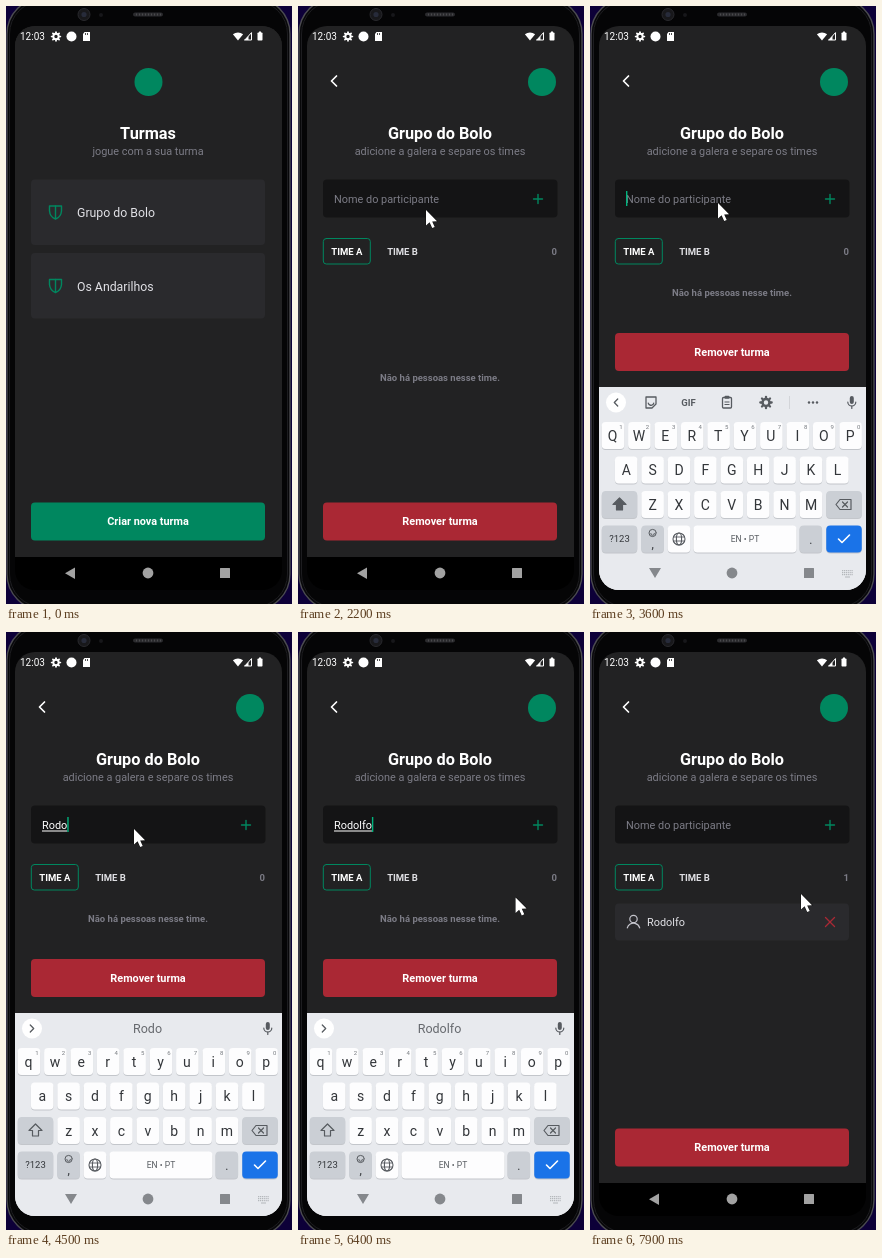
An HTML page with a canvas for the animation above (8000 ms loop, 286 px wide and 598 px high).

```html
<!DOCTYPE html>
<html lang="pt">
<head>
<meta charset="utf-8">
<title>Turmas</title>
<style>
html, body { margin: 0; width: 100%; height: 100%; overflow: hidden; background: #0d0038; }
canvas { display: block; width: 286px; height: 598px; }
</style>
</head>
<body>
<canvas id="stage"></canvas>
<script>
const W = 286, H = 598, LOOP = 8000, STEP = 100;
const GROUP = 'Grupo do Bolo', GROUP2 = 'Os Andarilhos', PLAYER = 'Rodolfo';
const C = {
  bg: '#222223', card: '#2a2a2d', field: '#141415', grey: '#7c7c86', text: '#e1e1e6',
  green: '#00875f', red: '#aa2834', kb: '#e8eaee', key: '#fdfdfe', mod: '#cbcfd5', ink: '#33363a', icon: '#575b60'
};
const canvas = document.getElementById('stage');
const g = canvas.getContext('2d');
const dpr = window.devicePixelRatio || 1;
canvas.width = W * dpr;
canvas.height = H * dpr;

const clamp = v => Math.max(0, Math.min(1, v));
const ease = v => v * v * (3 - 2 * v);

function rect(x, y, w, h, r, fill, stroke, lw = 1) {
  g.beginPath();
  g.roundRect(x, y, w, h, r);
  if (fill) { g.fillStyle = fill; g.fill(); }
  if (stroke) { g.strokeStyle = stroke; g.lineWidth = lw; g.stroke(); }
}
function disc(x, y, r, fill, stroke, lw = 1) {
  g.beginPath();
  g.arc(x, y, r, 0, Math.PI * 2);
  if (fill) { g.fillStyle = fill; g.fill(); }
  if (stroke) { g.strokeStyle = stroke; g.lineWidth = lw; g.stroke(); }
}
function line(pts, color, lw = 1.2, closed = false) {
  shape(pts);
  if (closed) g.closePath();
  g.strokeStyle = color;
  g.lineWidth = lw;
  g.lineCap = g.lineJoin = 'round';
  g.stroke();
}
function shape(pts, fill) {
  g.beginPath();
  for (let i = 0; i < pts.length; i += 2) g.lineTo(pts[i], pts[i + 1]);
  if (fill) { g.fillStyle = fill; g.fill(); }
}
// y is the middle of the capital letters
function label(s, x, y, size, color, weight = 400, align = 'left') {
  g.font = `${weight} ${size}px Roboto, sans-serif`;
  g.textAlign = align;
  g.fillStyle = color;
  g.fillText(s, x, y + size * 0.355);
  return g.measureText(s).width;
}
function withAlpha(a, draw) {
  g.save();
  g.globalAlpha *= a;
  draw();
  g.restore();
}
function scaled(k, draw) {
  g.save();
  g.translate(142.5, 285.5);
  g.scale(k, k);
  g.translate(-142.5, -285.5);
  draw();
  g.restore();
}

function gear(x, y, r, color) {
  for (let i = 0; i < 8; i++) {
    const a = i * Math.PI / 4, c = Math.cos(a), s = Math.sin(a);
    line([x + c * r * 0.7, y + s * r * 0.7, x + c * r * 0.95, y + s * r * 0.95], color, r * 0.38);
  }
  disc(x, y, r * 0.58, null, color, r * 0.42);
}
function shield(x, y) {
  g.beginPath();
  g.moveTo(x - 6, y - 6);
  g.lineTo(x + 6, y - 6);
  g.lineTo(x + 6, y - 1);
  g.quadraticCurveTo(x + 5.5, y + 5, x, y + 7);
  g.quadraticCurveTo(x - 5.5, y + 5, x - 6, y - 1);
  g.closePath();
  g.strokeStyle = C.green;
  g.lineWidth = 1.4;
  g.lineJoin = 'round';
  g.stroke();
  line([x, y - 6, x, y + 6.5], C.green, 1.4);
}

function phone() {
  g.fillStyle = '#0d0038';
  g.fillRect(0, 0, W, H);
  rect(1, -8, 283, 612, 36, '#08080a', '#4b4b50', 1.4);
  rect(3.5, -5, 278, 606, 33, '#050506', '#1d1d20', 1);
  disc(78, 8.5, 6, '#18181b', '#29292d');
  disc(78, 8.5, 2.6, '#272b3a');
  disc(95, 9, 2, '#17171a');
  rect(127, 6.5, 30, 4, 2, '#2b2b2e');
  for (let x = 130; x < 156; x += 3) rect(x, 7.5, 1, 2, 0, '#4a4a4d');
}
function statusBar() {
  label('12:03', 14, 30.5, 10, '#fff');
  gear(50, 30.5, 4.6, '#fff');
  disc(65.5, 30.5, 5, '#fff');
  shape([78.5, 26, 84, 26, 84, 35, 77, 35, 77, 28], '#fff');
  for (const x of [79, 81]) rect(x, 27, 0.8, 2, 0, C.bg);
  g.beginPath();
  g.moveTo(232, 34.5);
  g.arc(232, 34.5, 8, -Math.PI * 0.72, -Math.PI * 0.28);
  g.fillStyle = '#fff';
  g.fill();
  line([238.5, 34, 245.5, 34, 245.5, 27], '#fff', 1, true);
  shape([238.5, 34, 242.5, 34, 242.5, 30], '#fff');
  rect(251.5, 26.5, 5, 8, 0.8, '#fff');
  rect(253, 25.5, 2, 1.5, 0, '#fff');
}
function navBar(light, kbIcon) {
  const c = light ? '#85888c' : '#a2a2a2';
  g.fillStyle = light ? C.kb : '#000';
  g.fillRect(9, 551, 267, 34);
  shape(light ? [59, 562, 71, 562, 65, 572] : [69, 561.5, 69, 573, 59, 567.2], c);
  disc(142, 567, 5.4, c);
  rect(214, 562, 10, 10, 0.5, c);
  if (!kbIcon) return;
  const k = light ? '#b4b7bb' : '#777';
  for (let r = 0; r < 3; r++)
    for (let i = 0; i < 6; i++) rect(252 + i * 1.9, 564 + r * 2, 1.2, 1.2, 0, k);
  rect(255, 570.5, 5, 1, 0, k);
}

function button(s, y, color) {
  rect(25, y, 234, 38, 4, color);
  label(s, 142, y + 19, 10.9, '#fff', 700, 'center');
}
function heading(title, sub) {
  label(title, 142, 127.5, 16.3, '#fff', 700, 'center');
  label(sub, 142, 145.5, 10.9, C.grey, 400, 'center');
}
function background() {
  g.fillStyle = C.bg;
  g.fillRect(9, 20, 267, 531);
}
function groupCard(name, y) {
  rect(25, y, 234, 65.5, 4, C.card);
  shield(49.5, y + 32.5);
  label(name, 71, y + 33.5, 12.3, C.text);
}
function groupsScreen(press) {
  background();
  disc(142.5, 76, 14, C.green);
  heading('Turmas', 'jogue com a sua turma');
  withAlpha(press, () => groupCard(GROUP, 173.5));
  groupCard(GROUP2, 247);
  button('Criar nova turma', 496.5, C.green);
}

function playersScreen(s) {
  background();
  line([38.5, 70, 33.5, 75, 38.5, 80], '#fff', 1.7);
  disc(244, 76, 14, C.green);
  heading(GROUP, 'adicione a galera e separe os times');
  rect(25, 173.5, 234.5, 38, 4, C.field);
  let end = 36;
  if (s.typed) {
    const w = label(s.typed, 36, 193, 10.9, '#fff');
    rect(36, 198.6, w, 0.8, 0, '#fff');
    end += w;
  } else label('Nome do participante', 36, 193, 10.9, C.grey);
  if (s.caret) rect(end, 185, 1.4, 15, 0, '#00b37e');
  withAlpha(s.press ? 0.3 : 1, () => {
    line([235.5, 193, 244.5, 193], C.green, 1.4);
    line([240, 188.5, 240, 197.5], C.green, 1.4);
  });
  rect(25.3, 232.5, 47, 25.5, 3, null, C.green, 1);
  label('TIME A', 48.8, 245.5, 9.5, '#fff', 700, 'center');
  label('TIME B', 104.5, 245.5, 9.5, '#dedee2', 700, 'center');
  label(s.added ? '1' : '0', 259, 245.5, 9.5, C.grey, 700, 'right');
  if (s.added) {
    rect(25, 271.5, 234, 37, 4, C.card);
    disc(43.5, 287, 3.7, null, '#c4c4cc', 1.2);
    g.beginPath();
    g.arc(43.5, 297.5, 6.4, Math.PI * 1.08, Math.PI * 1.92);
    g.stroke();
    label(PLAYER, 57, 290.5, 10.9, C.text);
    line([235.5, 285.5, 244.5, 294.5], C.red, 1.3);
    line([244.5, 285.5, 235.5, 294.5], C.red, 1.3);
  } else if (s.spin) {
    rect(141.5, 293.5, 2, 1, 0, C.green);
  } else if (s.empty) {
    label('Não há pessoas nesse time.', 142, s.short ? 286.5 : 371.5, 9.5, C.grey, 700, 'center');
  }
  button('Remover turma', s.short ? 327 : 496.5, C.red);
}

function keyCap(x, y, w, fill = C.key) {
  rect(x - w / 2, y - 13 + 1, w, 27, 4, '#c3c6cb');
  rect(x - w / 2, y - 13, w, 27, 4, fill);
}
function keyRow(chars, x0, y, upper, digits) {
  [...chars].forEach((ch, i) => {
    const x = x0 + i * 26.4;
    keyCap(x, y, 22.6);
    label(upper ? ch.toUpperCase() : ch, x - (digits ? 0.5 : 0), y + 1, 14, C.ink, 400, 'center');
    if (digits) label(String((i + 1) % 10), x + 8, y - 8.5, 6, '#75797e', 400, 'center');
  });
}
function toolbar(word, open) {
  disc(26, 396.5, 10, '#fff');
  const d = open ? -1.7 : 1.7;
  line([26 - d, 393, 26 + d, 396.5, 26 - d, 400], C.icon, 1.3);
  rect(259.8, 390, 4, 8, 2, C.icon);
  g.beginPath();
  g.arc(261.8, 396, 4, 0, Math.PI);
  g.strokeStyle = C.icon;
  g.lineWidth = 1.2;
  g.stroke();
  line([261.8, 400, 261.8, 402.5], C.icon);
  if (word) label(word, 141.5, 397, 12.5, '#66696e', 400, 'center');
  if (!open) return;
  line([56, 391, 66, 391, 66, 398, 62, 402, 56, 402], C.icon, 1.3, true);
  g.beginPath();
  g.arc(61, 396.5, 2.8, 0.2, Math.PI - 0.2);
  g.stroke();
  label('GIF', 98.5, 396.5, 9.5, C.icon, 700, 'center');
  rect(132.5, 391.5, 9, 10.5, 1, null, C.icon, 1.3);
  rect(134.5, 389.8, 5, 3, 1, C.icon);
  for (const y of [395.5, 398]) rect(134.5, y, 5, 1, 0, C.icon);
  gear(176, 396.5, 6, C.icon);
  rect(199, 390, 0.8, 13, 0, '#cdd0d4');
  for (const x of [219, 223, 227]) disc(x, 396.5, 1.2, C.icon);
}
function keyboard(s) {
  g.fillStyle = C.kb;
  g.fillRect(9, 381, 267, 205);
  toolbar(s.typed, s.upper);
  keyRow('qwertyuiop', 23, 429, s.upper, true);
  keyRow('asdfghjkl', 36.2, 463.5, s.upper);
  keyRow('zxcvbnm', 62.6, 498, s.upper);
  keyCap(29.5, 498, 35.5, C.mod);
  const arrow = [29.5, 492, 36, 498.5, 32.5, 498.5, 32.5, 504, 26.5, 504, 26.5, 498.5, 23, 498.5];
  if (s.upper) shape(arrow, C.icon);
  line(arrow, C.icon, 1.2, true);
  keyCap(254, 498, 35.5, C.mod);
  line([246, 498.5, 250, 493.5, 261, 493.5, 261, 503.5, 250, 503.5], C.icon, 1.2, true);
  line([252.5, 496, 257.5, 501], C.icon);
  line([257.5, 496, 252.5, 501], C.icon);
  keyCap(29.5, 532.5, 35.5, C.mod);
  label('?123', 29.5, 533, 9.5, C.ink, 400, 'center');
  keyCap(62.6, 532.5, 22.6, C.mod);
  disc(62.6, 527, 3.6, null, C.icon, 1);
  g.beginPath();
  g.arc(62.6, 527.5, 1.8, 0, Math.PI);
  g.stroke();
  label(',', 62.6, 538, 12, C.ink, 400, 'center');
  keyCap(89, 532.5, 22.6);
  disc(89, 533, 6, null, C.icon, 1.1);
  g.beginPath();
  g.ellipse(89, 533, 2.6, 6, 0, 0, Math.PI * 2);
  g.stroke();
  for (const y of [531, 535]) line([83.4, y, 94.6, y], C.icon, 0.9);
  keyCap(155, 532.5, 103);
  label('EN • PT', 155, 533, 8.5, C.icon, 400, 'center');
  keyCap(220.8, 532.5, 22.6, C.mod);
  label('.', 220.8, 534, 12, C.ink, 400, 'center');
  keyCap(254, 532.5, 35.5, '#1a73e8');
  line([248.5, 533, 252, 536.5, 259.5, 529], '#fff', 1.6);
}

// time, x, y
const path = [
  [200, 176, 8], [700, 128, 203], [1800, 128, 203], [1900, 128, 204], [2200, 128, 204],
  [2400, 128, 197], [5300, 128, 197], [5400, 129, 198], [5700, 129, 198], [6100, 172, 262],
  [6500, 226, 266], [6700, 241, 215], [6800, 241, 215], [7000, 245, 198], [7600, 245, 198], [7900, 211, 262]
];
function pointer(t) {
  if (t < path[0][0]) return;
  let i = 0;
  while (i < path.length - 2 && t >= path[i + 1][0]) i++;
  const [t0, x0, y0] = path[i], [t1, x1, y1] = path[i + 1];
  const k = ease(clamp((t - t0) / (t1 - t0)));
  const x = x0 + (x1 - x0) * k, y = y0 + (y1 - y0) * k;
  const pts = [0, 0, 0, 15.5, 3.6, 12.3, 6.2, 18, 8.7, 16.9, 6.2, 11.4, 11, 11.2];
  const at = pts.map((v, j) => v + (j % 2 ? y : x));
  line(at, '#111', 1, true);
  shape(at, '#fff');
}

function typedText(t) {
  if (t < 4000 || t >= 7300) return '';
  return PLAYER.slice(0, t < 4200 ? 1 : 2 + Math.floor((t - 4200) / 120));
}
function caretOn(t) {
  if (t < 2500 || t >= 7300) return false;
  if (t < 4000) return t < 3100 || t >= 3600;
  if (t < 5100) return t < 4900;
  return t < 5700 || (t >= 6200 && t < 6700) || t >= 7200;
}

function draw(t) {
  g.setTransform(dpr, 0, 0, dpr, 0, 0);
  phone();
  g.save();
  g.beginPath();
  g.roundRect(9, 20, 267, 564, 20);
  g.clip();
  const s = {
    typed: typedText(t), caret: caretOn(t), upper: t < 4000, press: t === 7200,
    short: t >= 2800 && t < 7600, empty: t >= 1400, spin: t >= 7300 && t < 7500, added: t >= 7500
  };
  const up = t < 5000 ? ease(clamp((t - 2700) / 300)) : 1 - ease(clamp((t - 7500) / 300));
  if (t < 1400) {
    const k = clamp((t - 1100) / 200);
    background();
    scaled(1 + 0.113 * k * k, () => groupsScreen(t < 1100 ? 1 : t < 1300 ? 0.75 : 0.65));
    if (t >= 1300) withAlpha(0.08, () => scaled(0.96, () => playersScreen(s)));
  } else {
    playersScreen(s);
    if (t >= 2600 && t < 3000) {
      g.fillStyle = '#fff';
      g.fillRect(9, 381, 267, 170);
    }
    if (up > 0) {
      g.save();
      g.translate(0, (1 - up) * 170);
      keyboard(s);
      g.restore();
    }
  }
  navBar(up === 1, t >= 2500 && t < 7700);
  statusBar();
  pointer(t);
  g.restore();
}

function tick(now) {
  draw(Math.floor((now % LOOP) / STEP) * STEP);
  requestAnimationFrame(tick);
}
draw(0);
requestAnimationFrame(tick);
</script>
</body>
</html>
```
